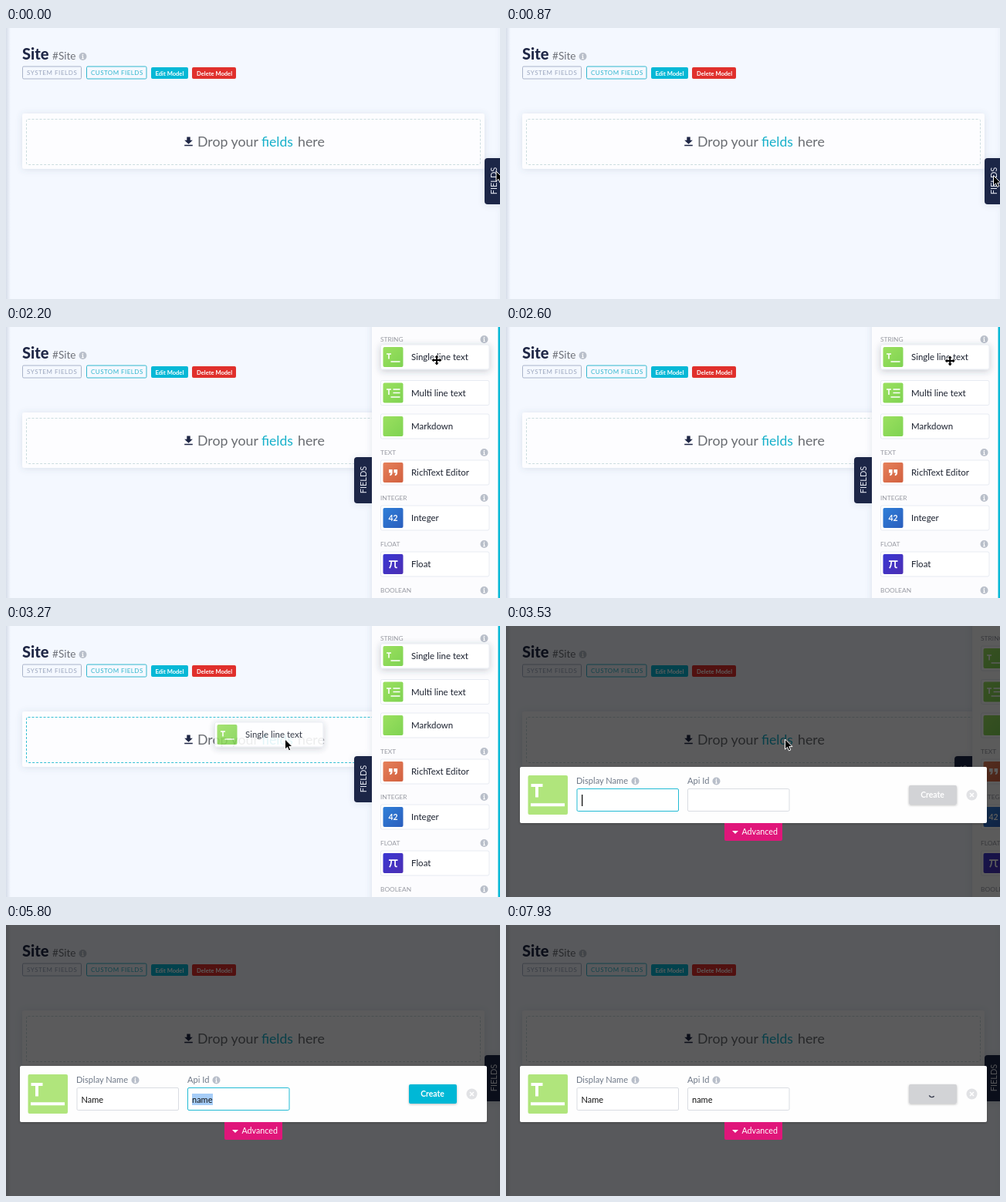
These frames come from a looping animation (640 by 352 pixels, 8000 ms). An HTML page:

```html
<!DOCTYPE html>
<html lang="en">
<head>
<meta charset="utf-8">
<title>Field builder</title>
<style>
html, body { margin: 0; width: 100%; height: 100%; overflow: hidden; background: #f4f8ff; }
svg { display: block; width: 100vw; height: 100vh; }
text { font-family: Lato, "Open Sans", sans-serif; white-space: pre; }
.b { font-weight: 700; }
</style>
</head>
<body>
<svg id="stage" viewBox="0 0 640 352" preserveAspectRatio="none"></svg>
<script>
const NAVY = '#1f2746', CYAN = '#06b8d6', LOOP = 8000;
const DRAWER_X = 474, CLOSED = 169;

// Markup helpers
const rect = (x, y, w, h, fill, more = '') =>
  `<rect x="${x}" y="${y}" width="${w}" height="${h}" fill="${fill}" ${more}/>`;
const text = (x, y, size, fill, str, more = '') =>
  `<text x="${x}" y="${y}" font-size="${size}" fill="${fill}" ${more}>${str}</text>`;
const group = (id, body, more = '') => `<g id="${id}" ${more}>${body}</g>`;
const line = (d, width, color = '#fff') =>
  `<path d="${d}" fill="none" stroke="${color}" stroke-width="${width}"/>`;
const info = (x, y, fill = '#b9bfca') =>
  `<circle cx="${x}" cy="${y}" r="5" fill="${fill}"/>` +
  `<circle cx="${x}" cy="${y - 2.4}" r=".8" fill="#fff"/>` +
  line(`M${x - 1} ${y - .6}h1v3.2m-1.2 0h2.4`, 1.1);
const gradient = (id, from, to) =>
  `<linearGradient id="${id}" x2="1" y2="1"><stop stop-color="${from}"/><stop offset="1" stop-color="${to}"/></linearGradient>`;
const shadow = (id, dy, blur, color, alpha) =>
  `<filter id="${id}" x="-20%" y="-40%" width="140%" height="200%"><feDropShadow dx="0" dy="${dy}" stdDeviation="${blur}" flood-color="${color}" flood-opacity="${alpha}"/></filter>`;

const defs = `<defs>
  ${gradient('green', '#9be05f', '#7fd352')}${gradient('orange', '#e5805a', '#d2603f')}
  ${gradient('blue', '#2f7fd8', '#2b5ebd')}${gradient('violet', '#3a37d2', '#4c2fb4')}
  <linearGradient id="edge"><stop stop-color="#5f6f90" stop-opacity=".2"/><stop offset="1" stop-color="#5f6f90" stop-opacity="0"/></linearGradient>
  ${shadow('soft', 1, 4, '#4a6080', .16)}${shadow('lift', 2, 4, '#303a50', .25)}
  ${shadow('small', 1, 1.5, '#000000', .25)}
</defs>`;

// Icons sit in a 26 x 26 square
const glyphs = {
  single: line('M4.5 9h6M7.5 9v6.5', 1.6) + line('M10 19h12', 1.5),
  multi: line('M4.5 8.5h6M7.5 8.5v7', 1.6) + line('M13 8.5h9M13 13h9M10 18.5h12', 1.5),
  quote: ['7.5', '14'].map(x => `<path d="M${x} 9h4.6v4.2q0 3.3-3.3 4v-1.8q1.2-.5 1.2-1.8h-2.5z" fill="#fff"/>`).join(''),
  number: text(13, 16.7, 10.5, '#fff', '42', 'class="b" text-anchor="middle"'),
  pi: line('M7.5 9.2h11.5M10.7 9.2q0 6-2.4 9M15.6 9.2v6.2q0 2.6 2.7 2', 1.7),
  none: ''
};

const cardBody = (label, fill, icon) =>
  rect(0, 0, 140.5, 32, '#fff', 'rx="2" stroke="#e7ebf2"') +
  `<g transform="translate(3 3)">${rect(0, 0, 26, 26, `url(#${fill})`, 'rx="2"')}${glyphs[icon]}</g>` +
  text(39.5, 20, 11.5, '#1c2230', label);
const card = (y, ...args) =>
  `<g transform="translate(11.5 ${y - 16})">${cardBody(...args)}</g>`;
const section = (y, label) => text(11, y + 3, 8.4, '#999ba3', label) + info(145.5, y);

const page =
  rect(0, 0, 640, 352, '#f4f8ff') + rect(0, 0, 6, 352, 'url(#edge)') +
  text(21, 41, 20, NAVY, 'Site', 'style="font-weight:800"') +
  text(60, 41, 13.6, '#6d7078', '#Site') + info(99.5, 37) +
  rect(21.5, 50, 76, 16, 'none', 'rx="1.5" stroke="#a9b3c9"') +
  text(27, 61, 8, '#9aa5bd', 'SYSTEM FIELDS', 'letter-spacing=".55"') +
  rect(104.5, 50, 77.5, 16, 'none', 'rx="1.5" stroke="#30b6cd"') +
  text(110, 61, 8, '#30b6cd', 'CUSTOM FIELDS', 'letter-spacing=".45"') +
  rect(188, 51, 48, 15, CYAN, 'rx="2"') + text(193.5, 61.5, 7.6, '#fff', 'Edit Model', 'class="b"') +
  rect(241, 51, 57, 15, '#e0302c', 'rx="2"') + text(247, 61.5, 7.6, '#fff', 'Delete Model', 'class="b"') +
  rect(21, 111, 599, 72, '#fdfdff', 'rx="3" filter="url(#soft)"') +
  rect(26.5, 118.5, 588, 59, 'none', 'id="zone" rx="2" stroke-dasharray="3 2"') +
  `<path d="M234.3 141.5h4.4v4.2h3.1l-5.3 5.1-5.3-5.1h3.1zM231.2 151.8h10.6v1.5h-10.6z" fill="${NAVY}"/>` +
  text(248, 154, 17.8, '#6a6d72', 'Drop your') + text(331, 154, 17.6, '#16b0ca', 'fields') +
  text(378, 154, 17.8, '#6a6d72', 'here');

const drawer =
  `<g filter="url(#soft)">${rect(0, -10, 190, 372, '#fcfcfe')}` +
  `<path d="M0 169h-19q-4 0-4 4v52q0 4 4 4h19z" fill="${NAVY}"/></g>` +
  text(0, 0, 11, '#e6e9f2', 'FIELDS', 'text-anchor="middle" transform="translate(-7.5 198.5) rotate(-90)"') +
  section(16, 'STRING') + section(163, 'TEXT') + section(222, 'INTEGER') +
  section(282, 'FLOAT') + section(342, 'BOOLEAN') +
  card(85.5, 'Multi line text', 'green', 'multi') + card(129, 'Markdown', 'green', 'none') +
  card(189, 'RichText Editor', 'orange', 'quote') + card(248, 'Integer', 'blue', 'number') +
  card(308, 'Float', 'violet', 'pi') +
  group('first', cardBody('Single line text', 'green', 'single')) +
  rect(163.5, 0, 2.5, 352, CYAN);

const tip = rect(498, 182, 122, 16, '#4b4b4e', 'rx="2" opacity=".92"') +
  text(503.5, 192.7, 8.2, '#f0f0f0', 'Click to collapse field selection.');

const input = (id, x, w) => rect(x, 211.5, w, 29, '#fff', `id="${id}" rx="1.5"`);
const modal =
  rect(18, 183, 605, 73, '#fefefe', 'rx="2" filter="url(#small)"') +
  rect(28.5, 194, 51.5, 51, '#b0e57c', 'rx="2"') +
  line('M32.5 207h15M40 207v15.5', 4) + line('M32 232.3h44', 4) +
  text(91, 205, 11.1, '#6f7988', 'Display Name') + info(167.5, 201.5) +
  text(235, 205, 11.1, '#6f7988', 'Api Id') + info(272.5, 201.5) +
  input('nameBox', 92, 131.5) + input('idBox', 235.5, 131.5) +
  rect(241, 219, 27, 15, '#a6cdf8', 'id="selection"') +
  text(97.5, 230.5, 11, '#111', '', 'id="nameText"') + text(241, 230.5, 11, '#111', '', 'id="idText"') +
  rect(0, 219, 1.3, 15, '#111', 'id="caret"') +
  rect(522, 207, 62, 25, '#d2d3d6', 'id="button" rx="2" filter="url(#small)"') +
  text(552.5, 223.2, 10.4, '#fff', 'Create', 'id="create" class="b" text-anchor="middle"') +
  group('spinner', line('M-3.4 1.6A3.8 3.8 0 0 0 3 2.4', 1.4, '#3a3f50')) +
  '<circle cx="603.5" cy="219.5" r="7" fill="#e1e2e5"/>' + line('M601 217l5 5m0-5l-5 5', 1.5) +
  '<path d="M283 256h75v21q0 2-2 2h-71q-2 0-2-2z" fill="#e0167a"/>' +
  '<path d="M293 266h8l-4 4z" fill="#fff"/>' + text(305.5, 271.4, 10.7, '#fff', 'Advanced');

const arrow = '<path d="M0 0V13.2L3 10.4L5 15L7.3 14L5.3 9.6H9.5Z" fill="#000" stroke="#fff" stroke-width="1"/>';
const cross = '<path d="M0-6.5L2.6-3.6H1V-1H3.6V-2.6L6.5 0L3.6 2.6V1H1V3.6H2.6L0 6.5L-2.6 3.6H-1V1H-3.6V2.6L-6.5 0L-3.6-2.6V-1H-1V-3.6H-2.6Z" fill="#000" stroke="#fff" stroke-width="1.6" paint-order="stroke"/>';

const stage = document.getElementById('stage');
stage.innerHTML = defs + page + group('drawer', drawer) + group('tip', tip) +
  group('clone', cardBody('Single line text', 'green', 'single'), 'opacity=".88" filter="url(#lift)"') +
  rect(0, 0, 640, 352, '#000', 'id="shade"') + group('modal', modal) +
  group('cursor', group('arrow', arrow) + group('cross', cross));

// Update helpers
const el = {};
stage.querySelectorAll('[id]').forEach(n => el[n.id] = n);
const set = (id, name, value) => el[id].setAttribute(name, value);
const show = (id, on) => set(id, 'visibility', on ? 'inherit' : 'hidden');
const move = (id, x, y, more = '') => set(id, 'transform', `translate(${x} ${y})${more}`);
const ramp = (t, from, to) => Math.min(1, Math.max(0, (t - from) / (to - from)));
const mix = (a, b, p) => a + (b - a) * p;
const inOut = p => p * p * (3 - 2 * p);
const blend = (a, b, p) => `rgb(${a.map((v, i) => Math.round(mix(v, b[i], p)))})`;

// CSS "ease": cubic-bezier(.25, .1, .25, 1)
function ease(x) {
  const curve = (a, b, s) => 3 * a * s * (1 - s) ** 2 + 3 * b * s * s * (1 - s) + s ** 3;
  let lo = 0, hi = 1;
  for (let i = 0; i < 24; i++) {
    const mid = (lo + hi) / 2;
    if (curve(.25, .25, mid) < x) lo = mid; else hi = mid;
  }
  return curve(.1, 1, lo);
}

// [start, end, x, y] for each cursor move
const moves = [[70, 870, 631.5, 191.5], [1430, 2130, 558, 43], [2250, 2650, 576, 44], [2710, 3230, 361.5, 147]];
function cursorAt(t) {
  let x = 635, y = 186;
  for (const [from, to, nx, ny] of moves) {
    const p = inOut(ramp(t, from, to));
    x = mix(x, nx, p);
    y = mix(y, ny, p);
  }
  return [x, y];
}

const DROP = 3320, TYPE = [4670, 4870, 5000, 5130], TAB = 5470, SUBMIT = 7470;

function draw(t) {
  const [x, y] = cursorAt(t);
  const dragging = t >= 2700 && t < DROP;
  const open = ease(ramp(t, 1000, 1450)) - ease(ramp(t, DROP, DROP + 450));
  move('drawer', DRAWER_X + CLOSED * (1 - open), 0);
  show('tip', t >= 1250 && t < 1530);

  const hover = ramp(t, 2000, 2130) - ramp(t, DROP, DROP + 130);
  move('first', 11.5, 26 - 3 * hover);
  set('first', 'filter', hover > .3 ? 'url(#lift)' : 'none');
  show('clone', dragging);
  move('clone', x - 91, y - 22);
  set('zone', 'stroke', dragging ? '#35bfd3' : '#cbdcdf');

  const shade = ramp(t, DROP + 10, DROP + 170);
  set('shade', 'opacity', .64 * shade);
  set('modal', 'opacity', shade);
  show('modal', shade > 0);

  const typed = TYPE.filter(k => t >= k).length;
  el.nameText.textContent = 'Name'.slice(0, typed);
  el.idText.textContent = 'name'.slice(0, typed);
  set('nameBox', 'stroke', t < TAB ? '#22bbd4' : '#d9dce2');
  set('idBox', 'stroke', t >= TAB && t < SUBMIT ? '#22bbd4' : '#d9dce2');
  show('selection', t >= TAB && t < SUBMIT);
  show('caret', t < 4000 || (t >= TYPE[0] && t < TAB));
  set('caret', 'x', 98 + (typed ? el.nameText.getComputedTextLength() : 0));

  const active = ramp(t, TYPE[0], TYPE[0] + 270) - ramp(t, SUBMIT, SUBMIT + 200);
  set('button', 'fill', blend([210, 211, 214], [6, 184, 214], active));
  show('create', t < SUBMIT);
  show('spinner', t >= SUBMIT);
  move('spinner', 551.7, 219.8, ` rotate(${(t - 7930) * 360 / 750})`);

  const cross = t >= 2060 && t < 2700;
  move('cursor', x, y);
  show('cursor', t < TYPE[0]);
  show('cross', cross);
  show('arrow', !cross);
}

const start = performance.now();
function tick() {
  draw((performance.now() - start) % LOOP);
  requestAnimationFrame(tick);
}
draw(0);
requestAnimationFrame(tick);
</script>
</body>
</html>
```
